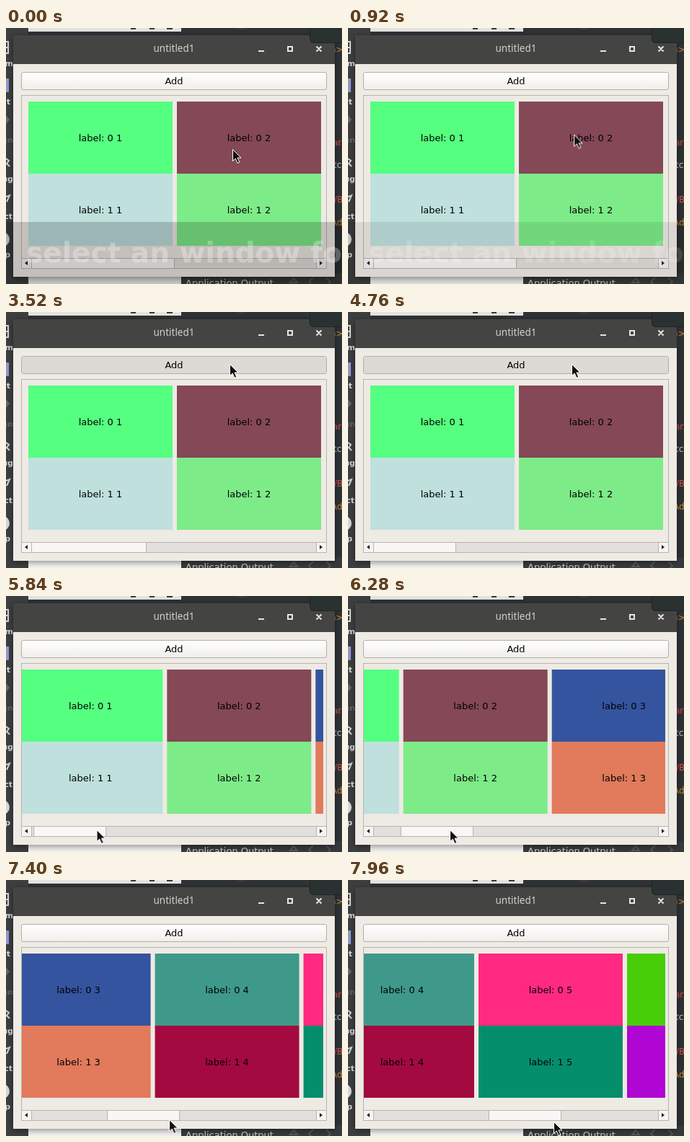
These frames come from a looping animation (466 by 355 pixels, 8000 ms). An HTML page:

```html
<!DOCTYPE html>
<html lang="en">
<head>
<meta charset="utf-8">
<title>Scrolling grid</title>
<style>
html, body { margin: 0; width: 100%; height: 100%; overflow: hidden; background: #2e3032; }
#stage { position: relative; width: 466px; height: 355px; overflow: hidden; font: 13px/16px "DejaVu Sans", sans-serif; color: #000; }
#stage div, #stage svg { position: absolute; box-sizing: border-box; }
#stage > svg { left: 0; top: 0; }

#window { left: 10px; top: 10px; width: 446px; height: 335px; background: #eeeae4; box-shadow: 0 2px 9px rgba(0, 0, 0, .45); }
#title { left: 0; top: 0; width: 446px; height: 40px; background: #444442; color: #d2d1ce; text-align: center; font: 500 13.5px/37px "Noto Sans", sans-serif; }
#button { left: 11px; top: 51px; width: 424px; height: 25px; border: 1px solid #b1aeaa; border-radius: 3px; background: linear-gradient(#fff, #f0eeea); text-align: center; line-height: 23px; }
#pressed { inset: 0; background: #dbdad5; border-radius: 2px; opacity: 0; animation: press 8s step-end infinite; }
#caption { left: 0; width: 100%; }

#area { left: 11px; top: 83px; width: 424px; height: 241px; border: 1px solid #b7b4af; }
#view { left: 0; top: 0; width: 418px; height: 225px; overflow: hidden; }
#grid { left: 9px; top: 8px; animation: scroll 8s linear infinite; }
.cell { width: 200px; height: 100px; line-height: 101px; text-align: center; white-space: pre; }

#bar { left: 0; top: 225px; width: 422px; height: 14px; background: #e1e0dc; border-top: 1px solid #b7b4af; }
.arrow { top: 0; width: 14px; height: 13px; background: #f6f5f3; }
.arrow::after { content: ""; position: absolute; left: 4px; top: 3px; border: 3.5px solid transparent; }
.back { left: 0; border-right: 1px solid #b7b4af; }
.back::after { border-right: 4px solid #222; border-left: 0; }
.next { right: 0; border-left: 1px solid #b7b4af; }
.next::after { border-left: 4px solid #222; border-right: 0; }
#thumb { left: 13px; top: 0; height: 13px; background: #f8f7f5; border: solid #b7b4af; border-width: 0 1px; animation: shrink 8s step-end infinite, slide 8s linear infinite; }

#banner { left: 0; top: 269px; width: 466px; height: 86px; background: rgba(0, 0, 0, .18); color: rgba(255, 255, 255, .28); font: bold 39px/86px "DejaVu Sans", sans-serif; white-space: nowrap; text-indent: 28px; animation: fade 8s linear infinite; }
#stage > #cursor { animation: point 8s linear infinite; }

@keyframes fade { 0%, .5% { opacity: 1; } 21.5%, 100% { opacity: 0; } }
@keyframes press {
  0%, 35.5%, 44.5%, 60%, 100% { opacity: 0; }
  35%, 44%, 59.5% { opacity: 1; }
}
@keyframes shrink {
  0% { width: 199px; }
  35.5% { width: 160px; }
  44.5% { width: 134px; }
  51.5% { width: 115px; }
  60%, 100% { width: 101px; }
}
@keyframes scroll {
  0%, 72.5% { transform: translateX(0); }
  78.5% { transform: translateX(-160px); }
  85.5% { transform: translateX(-328px); }
  92.5% { transform: translateX(-442px); }
  99.5%, 100% { transform: translateX(-674px); }
}
@keyframes slide {
  0%, 72.5% { transform: translateX(0); }
  78.5% { transform: translateX(38px); }
  85.5% { transform: translateX(78px); }
  92.5% { transform: translateX(105px); }
  99.5%, 100% { transform: translateX(160px); }
}
@keyframes point {
  0%, 8% { transform: translate(313px, 167px); animation-timing-function: ease-in-out; }
  19%, 62% { transform: translate(309px, 71px); }
  62% { animation-timing-function: ease-in-out; }
  71%, 72.5% { transform: translate(123px, 323px); }
  78.5% { transform: translate(140px, 323px); }
  85.5% { transform: translate(202px, 329px); }
  92.5% { transform: translate(225px, 331px); }
  99.5%, 100% { transform: translate(284px, 334px); }
}
</style>
</head>
<body>
<div id="stage">
  <svg width="466" height="355" font-family="DejaVu Sans, sans-serif" font-size="12">
    <rect width="466" height="355" fill="#303335"/>
    <rect width="31" height="355" fill="#3d3f41"/>
    <path d="M31 0H243V5H31z" fill="#e4e4e2"/>
    <path d="M31 340H243V355H31z" fill="#f4f4f3"/>
    <path d="M243 340H466V355H243z" fill="#383b3d"/>
    <path d="M0 70H4V89H0z" fill="#8f9bd0"/>
    <path d="M0 19H4M0 27H4M0 35H4M3 19V36" stroke="#d5d5d5" stroke-width="2" fill="none"/>
    <path d="M0 121L5 127L0 133" fill="#66686a"/>
    <path d="M0 181L4 184L1 188L5 192M0 234L5 232L1 241" stroke="#d5d5d5" stroke-width="2" fill="none"/>
    <circle cx="-5" cy="293" r="10" fill="#dadada"/>
    <g fill="#dcdcdc" font-size="11" font-weight="bold" text-anchor="end">
      <text x="10" y="53">om</text><text x="6" y="106">lt</text>
      <text x="10" y="159" fill="#66686a">gn</text><text x="10" y="213">ug</text>
      <text x="9" y="265">ect</text><text x="6" y="318">p</text>
    </g>
    <g fill="#c8c8c8">
      <text x="450" y="34" fill="#d08b3e">n&gt;</text>
      <text x="453" y="163" fill="#e0524f">ar</text>
      <text x="454" y="194">tc</text>
      <text x="455" y="242" fill="#e0524f">/B</text>
      <text x="451" y="274" fill="#d08b3e">Ad</text>
    </g>
    <path d="M322 0H333M173 0H180M199 0H206M223 0H231" stroke="#3c3c3c" stroke-width="4"/>
    <text x="249" y="358" font-size="13" fill="#d0d0d0">Application Output</text>
    <path d="M394 353L399 347L404 353zM426 346L420 352L426 358M444 346L450 352L444 358" fill="none" stroke="#54585a" stroke-width="2"/>
  </svg>

  <div id="window">
    <div id="title">untitled1</div>
    <div id="button"><div id="pressed"></div><div id="caption">Add</div></div>
    <div id="area">
      <div id="view"><div id="grid"></div></div>
      <div id="bar">
        <div id="thumb"></div>
        <div class="arrow back"></div>
        <div class="arrow next"></div>
      </div>
    </div>
  </div>

  <svg width="466" height="60" fill="none" stroke="#e6e5e2" stroke-width="2">
    <path d="M350 32H358M391 26H397V32H391zM430.5 25.5L437.5 32.5M437.5 25.5L430.5 32.5"/>
    <path d="M421.5 -1V15Q421.5 20.5 427 20.5H467V-1z" fill="#2a3231" stroke="#1f2524" stroke-width="1"/>
  </svg>
  <div id="banner">select an window for</div>
  <svg id="cursor" width="16" height="24" viewBox="-1 -1 16 24">
    <path d="M.5 .5V16.5L4.2 13L7 19.3L9.8 18.1L7 12H12z" fill="#111" stroke="#fff"/>
  </svg>
</div>
<script>
const colors = [
  ["#55ff80", "#844857", "#35549f", "#3e998b", "#ff2981", "#47ce08"],
  ["#bfe0dd", "#7deb88", "#e27a5c", "#a30a40", "#058e6c", "#b005d3"]
];
const grid = document.getElementById("grid");
colors.forEach((row, r) => row.forEach((color, c) => {
  const cell = document.createElement("div");
  cell.className = "cell";
  cell.textContent = `label: ${r} ${c + 1}`;
  cell.style.cssText = `left:${c * 206}px;top:${r * 100}px;background:${color}`;
  grid.append(cell);
}));
</script>
</body>
</html>
```
